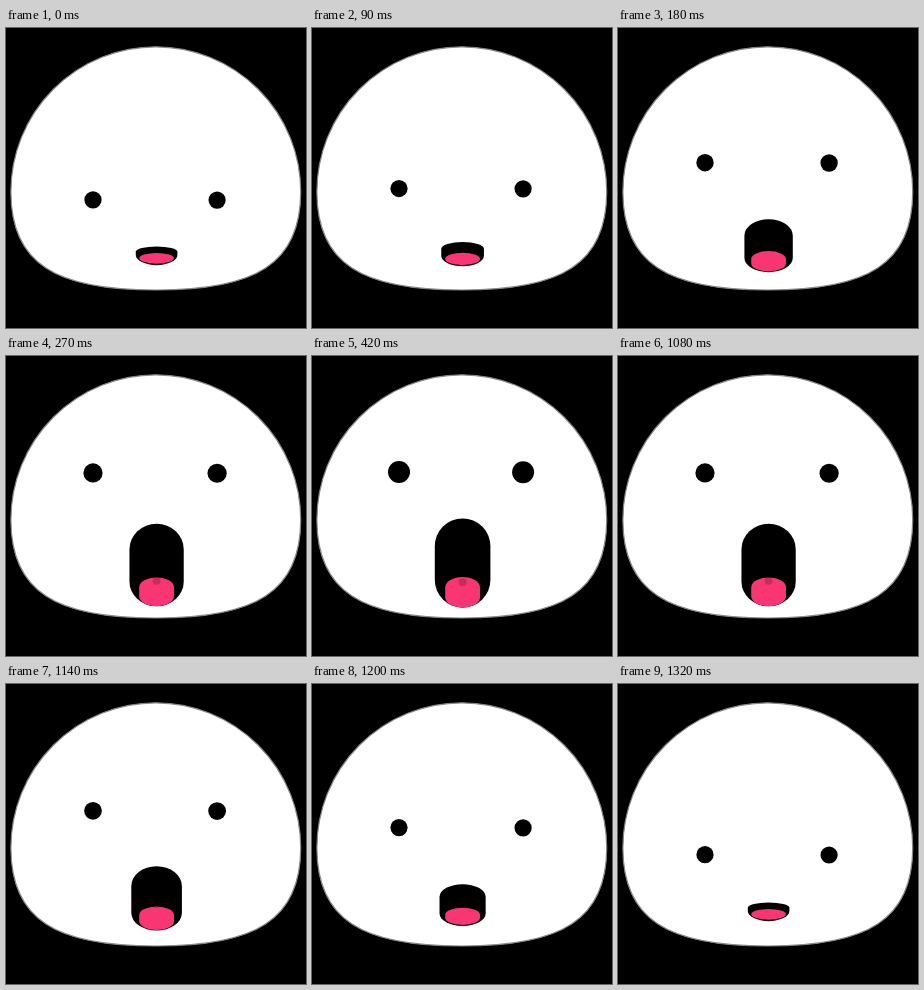
These frames come from a looping animation (300 by 300 pixels, 1350 ms). An HTML page with a canvas:

```html
<!DOCTYPE html>
<html lang="en">
<head>
<meta charset="utf-8">
<title>Surprised face</title>
<style>
  html, body { margin: 0; height: 100%; overflow: hidden; background: #000; }
  canvas { display: block; }
</style>
</head>
<body>
<canvas id="stage" width="300" height="300"></canvas>
<script>
const ctx = document.getElementById('stage').getContext('2d');
const LOOP = 1350, STEP = 30;
const MOUTH_X = 150.6;

const lerp = (a, b, p) => a + (b - a) * p;

// Sine ease in and out between two times
function ease(t, start, end) {
  const u = Math.min(1, Math.max(0, (t - start) / (end - start)));
  return (1 - Math.cos(Math.PI * u)) / 2;
}

function circle(x, y, r, color) {
  ctx.beginPath();
  ctx.arc(x, y, r, 0, 2 * Math.PI);
  ctx.fillStyle = color;
  ctx.fill();
}

// Upright capsule with elliptical caps of separate heights
function capsule(halfWidth, top, bottom, topCap, bottomCap, color) {
  ctx.beginPath();
  ctx.ellipse(MOUTH_X, top + topCap, halfWidth, topCap, 0, Math.PI, 2 * Math.PI);
  ctx.ellipse(MOUTH_X, bottom - bottomCap, halfWidth, bottomCap, 0, 0, Math.PI);
  ctx.closePath();
  ctx.fillStyle = color;
  ctx.fill();
}

function drawHead() {
  ctx.beginPath();
  ctx.arc(149.8, 163.7, 144.9, Math.PI, 2 * Math.PI);
  ctx.bezierCurveTo(294.7, 236, 249.6, 262, 149.8, 262);
  ctx.bezierCurveTo(50, 262, 4.9, 236, 4.9, 163.7);
  ctx.closePath();
  ctx.fillStyle = '#fff';
  ctx.fill();
  ctx.strokeStyle = '#888';
  ctx.lineWidth = 1.2;
  ctx.stroke();
}

function drawMouth(open) {
  const bottom = lerp(237.2, 251.7, open);
  ctx.save();
  capsule(lerp(20.8, 27.8, open), lerp(218.4, 162.4, open), bottom,
    lerp(5.2, 27.8, open), lerp(10.5, 27.8, open * open), '#000');
  ctx.clip();
  const cap = lerp(5.5, 10.5, open);
  capsule(17.4, lerp(225, 221, open), bottom - lerp(1.5, 0, open), cap, cap, '#f93574');
  ctx.clip();
  circle(MOUTH_X, lerp(210, 226.3, open), 4, 'rgba(0, 0, 0, 0.18)');
  ctx.restore();
}

function draw(now) {
  const t = Math.floor(now % LOOP / STEP) * STEP;
  const k = Math.min(t, LOOP - t); // the second half mirrors the first
  const eyeY = lerp(171.8, 116, ease(k, 4, 294));
  const eyeR = lerp(8.6, 11, ease(k, 150, 420));

  ctx.fillStyle = '#000';
  ctx.fillRect(0, 0, 300, 300);
  drawHead();
  circle(87, eyeY, eyeR, '#000');
  circle(211.1, eyeY + 0.3, eyeR, '#000');
  drawMouth(ease(k, 38, 328));
  requestAnimationFrame(draw);
}

draw(0);
</script>
</body>
</html>
```
